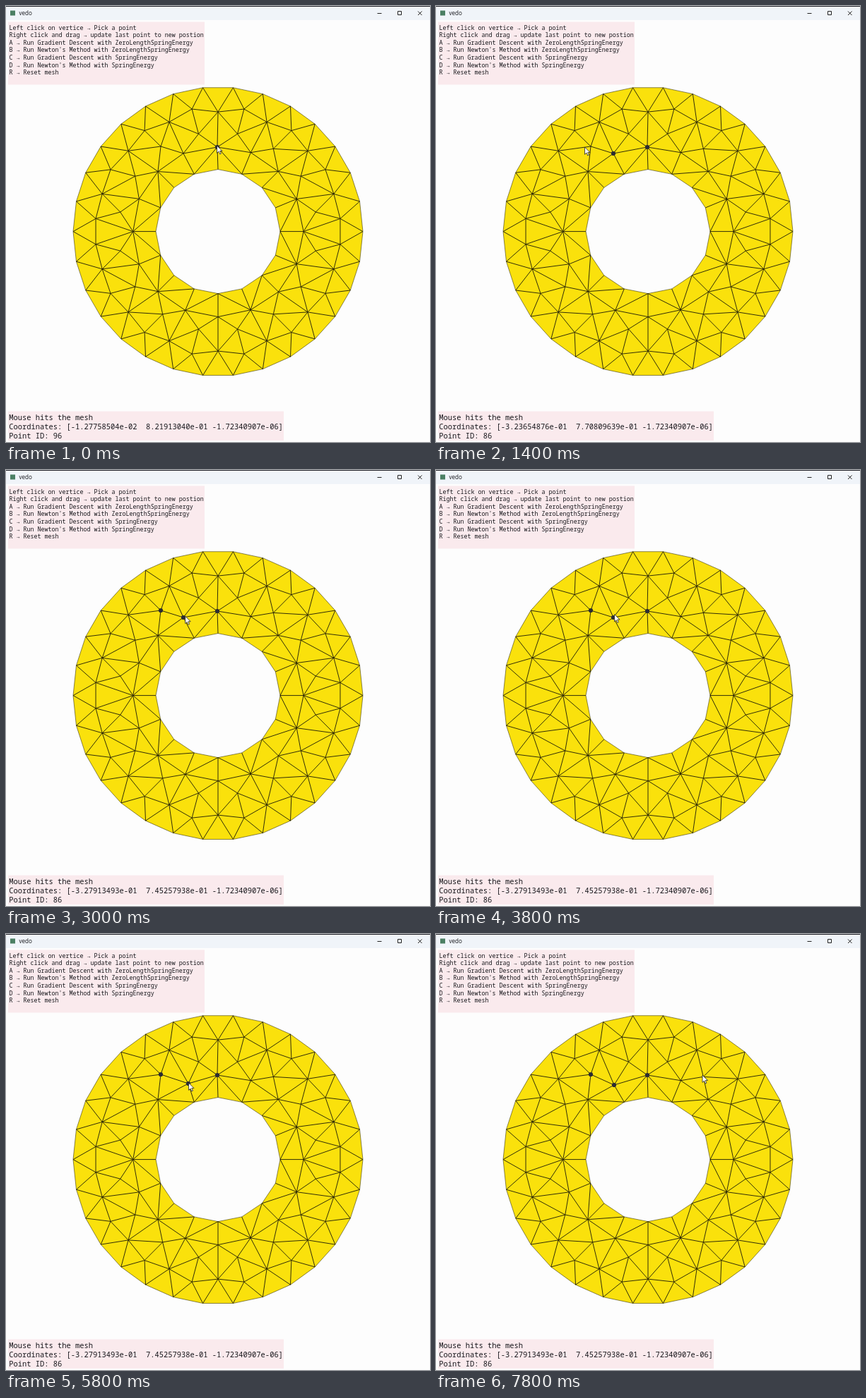
Write an HTML page that moves like this. It is 600 px wide and 618 px high and loops after 8 s.

```html
<!DOCTYPE html>
<html lang="en">
<head>
<meta charset="utf-8">
<title>vedo</title>
<style>
  html, body { margin: 0; width: 100%; height: 100%; overflow: hidden; background: #fdfdfd; }
  svg { display: block; width: 600px; height: 618px; }
  text { white-space: pre; fill: #17171c; }
  .mono { font-family: "Noto Sans Mono", "DejaVu Sans Mono", monospace; }
  .help { font-size: 8.36px; }
  .status { font-size: 10.43px; }
  .title { font: 8.1px "Open Sans", "Noto Sans", sans-serif; }
</style>
</head>
<body>
<svg viewBox="0 0 600 618">
  <rect width="600" height="618" fill="#fdfdfd"/>
  <rect width="600" height="20" fill="#f0f4f9"/>
  <rect width="600" height="1" fill="#24242b"/>
  <rect x="6" y="6.5" width="7" height="7" fill="#4b7f63"/>
  <text class="title" x="18.5" y="13.3">vedo</text>
  <path d="M525.5 10.5h6M554.5 7.5h5v5h-5zM583 7.5l5.5 5.5m0-5.5l-5.5 5.5" fill="none" stroke="#222"/>
  <g fill="#faeaed">
    <rect x="3" y="22.5" width="278" height="89"/>
    <rect x="3" y="574.5" width="390" height="41.5"/>
  </g>
  <g id="help" class="mono help"></g>
  <path id="annulus" fill="#fae10c" fill-rule="evenodd" stroke="#39370f" stroke-width=".6"/>
  <path id="edges" fill="none" stroke="#262408" stroke-width=".95"/>
  <g id="dots" fill="#2b2c33"></g>
  <g id="status" class="mono status"></g>
  <path id="cursor" d="M0 0V10.4L2.5 8.2L4.2 12L5.9 11.2L4.2 7.6H7.5Z" fill="#fff" stroke="#222" stroke-width=".8"/>
</svg>
<script>
const LOOP = 8000, STEP = 200;
const $ = id => document.getElementById(id);
const svgNode = (parent, tag, attrs) => {
  const node = document.createElementNS('http://www.w3.org/2000/svg', tag);
  for (const key in attrs) node.setAttribute(key, attrs[key]);
  return parent.appendChild(node);
};
const addLines = (parent, lines, x, y, gap) => lines.map((line, i) => {
  const node = svgNode(parent, 'text', { x, y: y + i * gap });
  node.textContent = line;
  return node;
});

addLines($('help'), [
  'Left click on vertice → Pick a point',
  'Right click and drag → update last point to new postion',
  'A → Run Gradient Descent with ZeroLengthSpringEnergy',
  "B → Run Newton's Method with ZeroLengthSpringEnergy",
  'C → Run Gradient Descent with SpringEnergy',
  "D → Run Newton's Method with SpringEnergy",
  'R → Reset mesh'
], 4.4, 33.6, 10.62);
const statusLines = addLines($('status'), ['Mouse hits the mesh', '', ''], 4.2, 587.4, 12.6);

// Concentric rings of vertices, counted from the top towards the left.
const ring = (count, shift, radius) => Array.from({ length: count }, (_, k) => {
  const angle = 2 * Math.PI * (k + shift) / count, r = radius(k, angle);
  return [300 - r * Math.sin(angle), 319.6 - r * Math.cos(angle)];
});
// Small radius changes decide which vertices fan out to the hole.
const fanRadius = k => {
  const flipped = k > 7 && k < 14;
  return 120.5 + .02 * k + ((k % 2 === 1) !== flipped ? .3 : -.3);
};
const inner = ring(16, 0, () => 88);
const fans = ring(16, 0, fanRadius);
const between = ring(16, .5, () => 141);
const wavy = ring(30, 0, (k, angle) => 173.5 - 4 * Math.cos(16 * angle));
const outer = ring(30, .5, () => 205);
const points = [...inner, ...fans, ...between, ...wavy, ...outer];
const firstOuter = points.length - outer.length;

function circumcircle([ax, ay], [bx, by], [cx, cy]) {
  bx -= ax; by -= ay; cx -= ax; cy -= ay;
  const d = 2 * (bx * cy - by * cx), b = bx * bx + by * by, c = cx * cx + cy * cy;
  const x = (cy * b - by * c) / d, y = (bx * c - cx * b) / d;
  return [ax + x, ay + y, x * x + y * y];
}

// Delaunay edges by the empty-circle test, without the two boundaries.
function delaunayEdges() {
  const found = new Map(), n = points.length;
  for (let i = 0; i < firstOuter; i++) for (let j = i + 1; j < n; j++) for (let k = j + 1; k < n; k++) {
    if (k < inner.length) continue;
    const [x, y, r2] = circumcircle(points[i], points[j], points[k]);
    const empty = points.every(([px, py], m) =>
      m === i || m === j || m === k || (px - x) ** 2 + (py - y) ** 2 > r2 - 1e-6);
    if (empty) for (const [a, b] of [[i, j], [j, k], [i, k]]) found.set(a * n + b, [a, b]);
  }
  return [...found.values()].filter(([a, b]) => b >= inner.length && a < firstOuter);
}
const edges = delaunayEdges();
const closedPath = corners => 'M' + corners.join('L') + 'Z';
$('annulus').setAttribute('d', closedPath(outer) + closedPath(inner));

// Picked vertices with their rest positions
const picked = [
  { index: points.indexOf(fans[0]), rest: [299, 200] },
  { index: points.indexOf(fans[1]), rest: [251, 209] },
  { index: points.indexOf(between[1]), rest: [219, 199] }
];
for (const { index, rest } of picked) points[index] = rest;
const dragged = picked[1];
const dots = picked.map(({ rest: [cx, cy] }) => svgNode($('dots'), 'circle', { cx, cy, r: 3.1 }));

const clicks = [
  { at: 0, id: 96, xy: '-1.27758504e-02  8.21913040e-01' },
  { at: 800, id: 86, xy: '-3.23654876e-01  7.70809639e-01' },
  { at: 1600, id: 48, xy: '-5.70654650e-01  8.51723358e-01' },
  { at: 3000, id: 86, xy: '-3.27913493e-01  7.45257938e-01' }
];
const DRAG_START = 4600, DRAG_END = 6800;

// Cursor tip: time, x, y
const track = [
  [0, 298.5, 198], [800, 252, 207.5], [1400, 210.5, 200], [2400, 254.5, 209],
  [3800, 252.5, 204.5], [5800, 258.5, 211], [DRAG_END, 252.5, 213], [7800, 377, 200]
];
function cursorAt(time) {
  const next = track.findIndex(key => key[0] > time);
  if (next < 0) return track[track.length - 1].slice(1);
  const [t0, x0, y0] = track[next - 1], [t1, x1, y1] = track[next];
  const u = (time - t0) / (t1 - t0), ease = u * u * (3 - 2 * u);
  return [x0 + (x1 - x0) * ease, y0 + (y1 - y0) * ease];
}

function draggedPosition(time) {
  if (time < DRAG_START) return dragged.rest;
  const [x, y] = cursorAt(Math.min(time, DRAG_END));
  return [x - .5, y + 1];
}

function draw(time) {
  $('cursor').setAttribute('transform', `translate(${cursorAt(time)})`);

  const [x, y] = points[dragged.index] = draggedPosition(time);
  $('edges').setAttribute('d', edges.map(([a, b]) => `M${points[a]}L${points[b]}`).join(''));
  dots[1].setAttribute('cx', x);
  dots[1].setAttribute('cy', y);
  dots.forEach((dot, i) => dot.setAttribute('visibility', time >= clicks[i].at ? 'visible' : 'hidden'));

  const click = clicks.filter(c => c.at <= time).pop();
  statusLines[1].textContent = `Coordinates: [${click.xy} -1.72340907e-06]`;
  statusLines[2].textContent = `Point ID: ${click.id}`;
}

const start = performance.now();
function tick() {
  const time = (performance.now() - start) % LOOP;
  draw(Math.floor(time / STEP) * STEP);
  requestAnimationFrame(tick);
}
tick();
</script>
</body>
</html>
```
